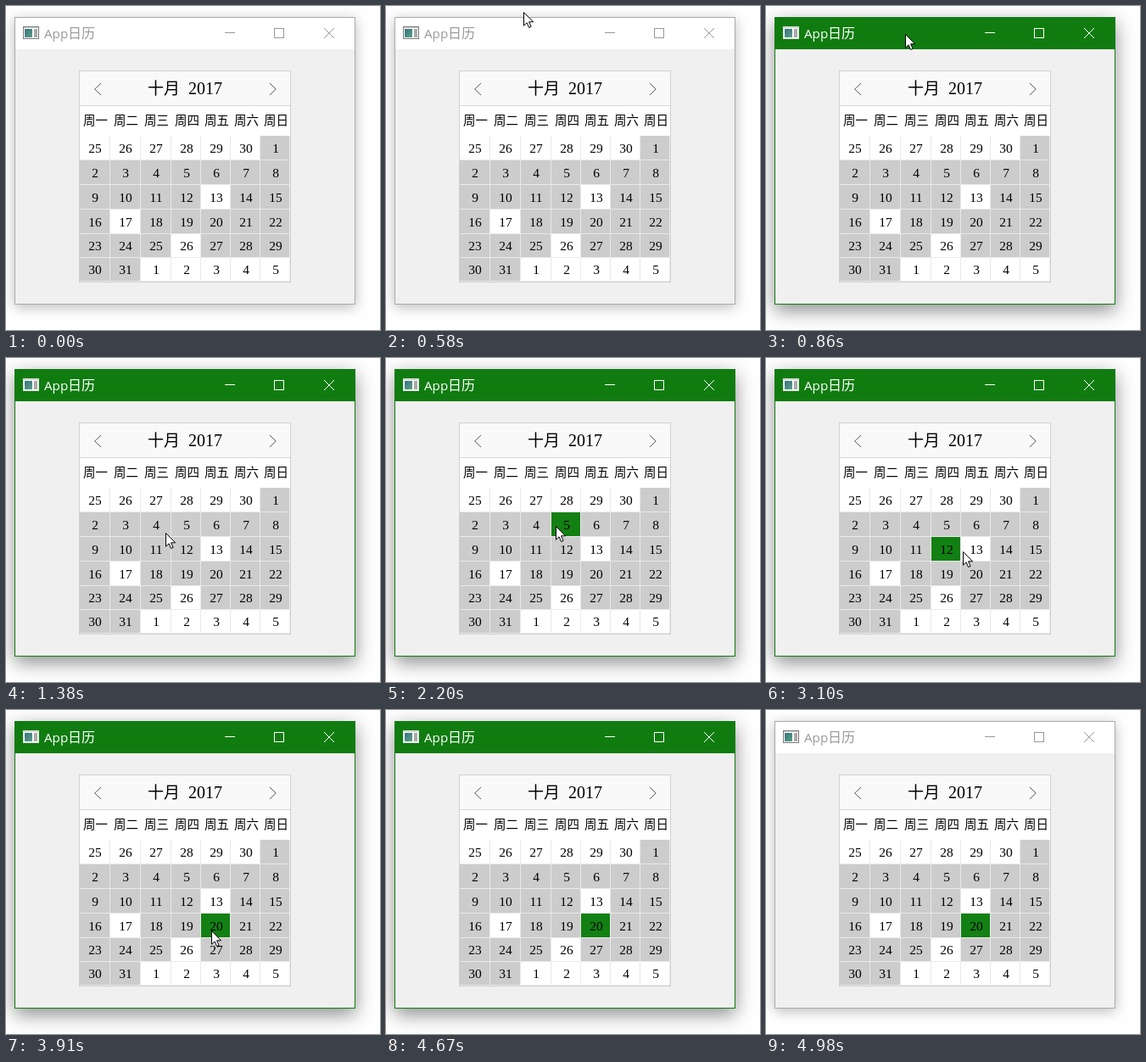
Animation of 441x382 px, one loop 5140 ms. Source, as an HTML page with a canvas:

```html
<!DOCTYPE html>
<html lang="zh-CN">
<head>
<meta charset="utf-8">
<style>
html, body { margin: 0; width: 441px; height: 382px; overflow: hidden; background: #fff; }
canvas { display: block; }
</style>
</head>
<body>
<canvas id="stage" width="441" height="382"></canvas>
<script>
const g = document.getElementById('stage').getContext('2d');
const LOOP = 5140, GLIDE = 240, HOPS = 3, GREEN = '#107c10';
const CJK = '"Noto Sans CJK SC", "Noto Sans CJK", sans-serif';
const SERIF = '"Liberation Serif", serif';

// Pointer stops: arrival time, x, y
const stops = [
  [120, 267, 228],
  [200, 230, 144],
  [580, 162, 7],
  [720, 164, 33],
  [1120, 176, 120],
  [1380, 188, 206],
  [1680, 214, 177],
  [1900, 200, 198],
  [2500, 136, 226],
  [2720, 196, 237],
  [2940, 232, 228],
  [3380, 246, 227],
  [3910, 242, 260],
  [4670, 356, 338]
];
const colX = i => 87 + i * 35 + Math.min(i, 3);
const rowY = i => 153 + i * 28 + Math.min(i, 4);

// The pointer reaches each stop in a few equal hops
function pointer(t) {
  const next = stops.findIndex(s => s[0] > t);
  if (next < 1) return stops[0].slice(1);
  const [t0, x0, y0] = stops[next - 1], [t1, x1, y1] = stops[next];
  const span = Math.min(GLIDE, t1 - t0);
  const k = Math.max(0, Math.floor((1 - (t1 - t) / span) * HOPS) / HOPS);
  return [Math.round(x0 + (x1 - x0) * k), Math.round(y0 + (y1 - y0) * k)];
}

function cellAt([x, y]) {
  let col = 6, row = 5;
  while (x < colX(col)) col--;
  while (y < rowY(row)) row--;
  return row * 7 + col;
}

// A drag from one day to another, then two single clicks
function selected(t) {
  if (t < 2060) return -1;
  if (t < 3240) return cellAt(pointer(Math.min(t, 2720)));
  return cellAt(pointer(t < 3840 ? 3240 : 3910));
}

function rect(x, y, w, h, color) {
  g.fillStyle = color;
  g.fillRect(x, y, w, h);
}

function frame(x, y, w, h, color) {
  g.strokeStyle = color;
  g.lineWidth = 1;
  g.strokeRect(x + .5, y + .5, w - 1, h - 1);
}

function line(color, ...points) {
  g.strokeStyle = color;
  g.lineWidth = 1;
  g.beginPath();
  points.forEach(([x, y]) => g.lineTo(x, y));
  g.stroke();
}

function text(s, x, y, font, color = '#000', align = 'center') {
  g.font = font;
  g.fillStyle = color;
  g.textAlign = align;
  g.fillText(s, x, y);
}

function shadow(alpha, blur, dy) {
  g.save();
  g.shadowColor = `rgba(0,0,0,${alpha})`;
  g.shadowBlur = blur;
  g.shadowOffsetY = dy;
  rect(10, 13, 402, 339, '#fff');
  g.restore();
}

function drawIcon(active) {
  rect(20, 24, 19, 15, '#fff');
  frame(20, 24, 19, 15, active ? '#dfe8df' : '#777');
  rect(21, 25, 17, 1, '#ccc');
  const fade = g.createLinearGradient(22, 27, 31, 37);
  fade.addColorStop(0, '#3b7184');
  fade.addColorStop(1, '#58a184');
  rect(22, 27, 9, 10, fade);
  rect(33, 27, 4, 10, '#aaa');
}

function drawWindow(active) {
  active ? shadow(.45, 21, 7) : shadow(.27, 14, 3);
  rect(10, 13, 402, 339, '#f0f0f0');
  rect(10, 13, 402, 38, active ? GREEN : '#fff');
  frame(10, 13, 402, 339, active ? GREEN : '#aaa');
  drawIcon(active);
  const ink = active ? '#fff' : '#999';
  text('App', 45, 38, '15.2px "Open Sans", sans-serif', ink, 'left');
  text('日历', 73, 38, '16px ' + CJK, ink, 'left');
  line(ink, [258, 31.5], [270, 31.5]);
  frame(316, 26, 12, 12, ink);
  line(ink, [375, 26], [387, 38]);
  line(ink, [387, 26], [375, 38]);
}

function drawCalendar(chosen) {
  rect(86, 76, 250, 250, '#fff');
  rect(87, 77, 248, 40, '#f9f9f9');
  rect(87, 117, 248, 1, '#d8d8d8');
  line('#555', [112, 91], [104.7, 98], [112, 105]);
  line('#555', [311, 91], [318.3, 98], [311, 105]);
  text('十月', 167, 104, '300 19px ' + CJK, '#000', 'left');
  text('2017', 215, 104, '20px ' + SERIF, '#000', 'left');

  [...'一二三四五六日'].forEach((d, i) =>
    text('周' + d, colX(i) + 18.5, 140, '14.5px ' + CJK));

  for (let i = 0; i < 42; i++) {
    const col = i % 7, row = Math.floor(i / 7);
    const x = colX(col), y = rowY(row);
    const w = colX(col + 1) - x, h = rowY(row + 1) - y;
    const day = i < 6 ? 25 + i : (i - 6) % 31 + 1;
    const plain = i < 6 || i > 36 || [13, 17, 26].includes(day);
    rect(x, y, w, h, '#e9e9e9');
    rect(x, y, w - 1, h - 1, plain ? '#fff' : i === chosen ? '#128012' : '#ccc');
    text(day, x + 18, y + Math.round(h / 2) + 5, '15.5px ' + SERIF);
  }
  frame(86, 76, 250, 250, '#d0d0d0');
}

const arrow = new Path2D('M.5 .5V16.2L4.1 12.8L6.6 18.5L9.1 17.4L6.6 11.8H11.6Z');
function drawPointer([x, y]) {
  g.save();
  g.translate(x, y);
  g.fillStyle = '#fff';
  g.fill(arrow);
  g.strokeStyle = '#000';
  g.lineWidth = 1;
  g.stroke(arrow);
  g.restore();
}

function draw(now) {
  const t = now % LOOP;
  rect(0, 0, 441, 382, '#fff');
  drawWindow(t >= 860 && t < 4980);
  drawCalendar(selected(t));
  if (t >= 120 && t < 4670) drawPointer(pointer(t));
}

const begin = performance.now();
function tick() {
  draw(performance.now() - begin);
  requestAnimationFrame(tick);
}
tick();
</script>
</body>
</html>
```
